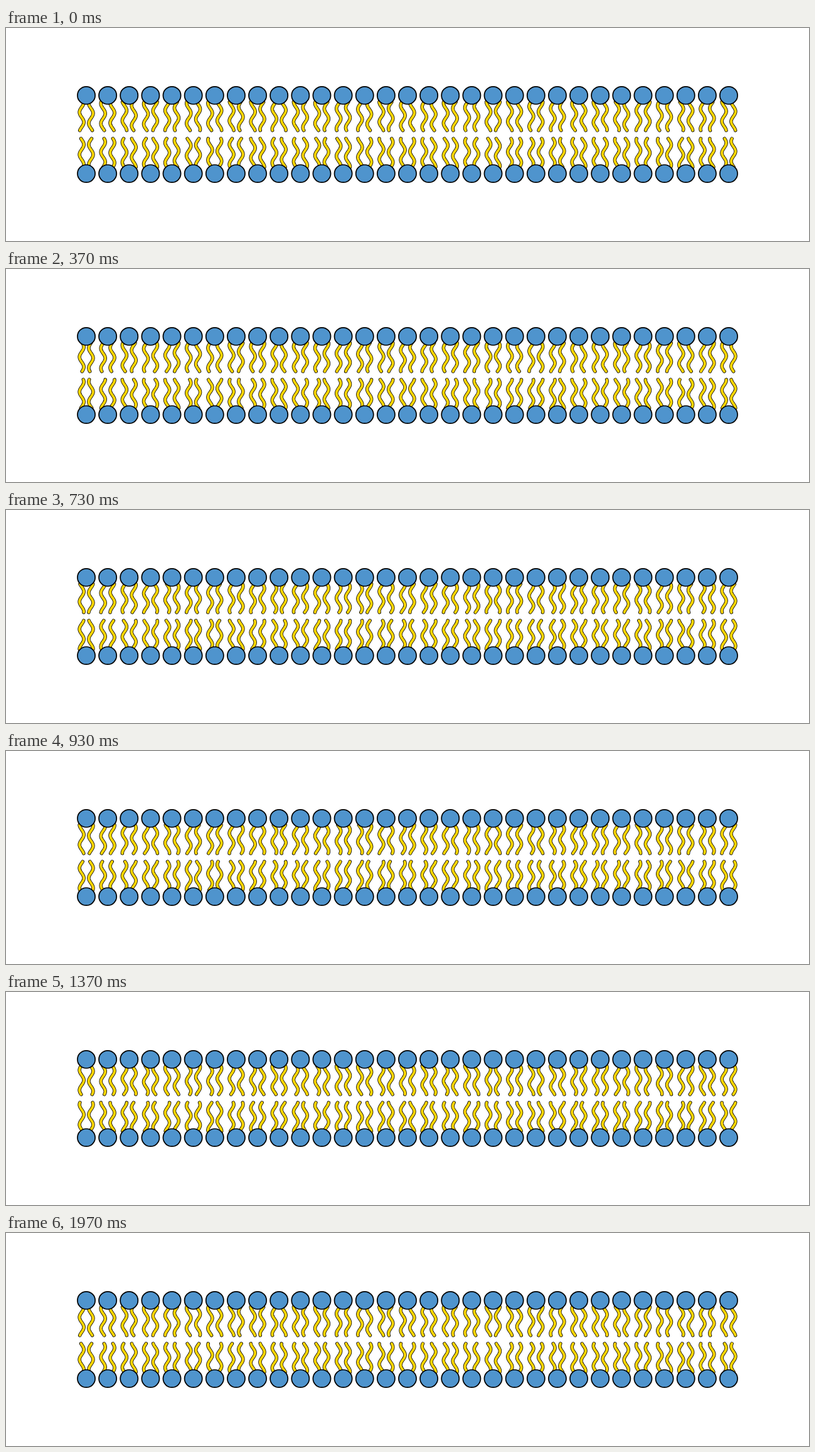
An HTML page with a canvas that plays this animation: 1280 px wide and 341 px high, repeating every 2010 ms.

```html
<!DOCTYPE html>
<html lang="en">
<head>
<meta charset="utf-8">
<title>Lipid bilayer</title>
<style>
  html, body { margin: 0; width: 100%; height: 100%; overflow: hidden; background: #fff; }
  canvas { display: block; width: 1280px; height: 341px; }
</style>
</head>
<body>
<canvas id="stage" width="1280" height="341"></canvas>
<script>
const ctx = document.getElementById('stage').getContext('2d');

const LOOP = 2010, STEPS = 59;
const COUNT = 31, FIRST_X = 128, PITCH = 1024 / 30, MID_Y = 170.5;
const HEAD_OFFSET = 62.6, HEAD_RADIUS = 14.1;
const TAIL_X = 7.4, ROOT = 52, TIP = 5.7;
const SWAY = 3.5, WAVELENGTH = 32;

function seededRandom(seed) {
  return () => (seed = seed * 16807 % 2147483647) / 2147483647;
}

// Each tail leans right at its own moment, mostly late in the loop.
const random = seededRandom(4711);
const tails = [];
for (const side of [-1, 1]) {
  for (let i = 0; i < COUNT; i++) {
    for (const offset of [-TAIL_X, TAIL_X]) {
      const peak = (side < 0 ? 0.76 : 0.5) + 0.7 * (random() - 0.5);
      tails.push({ side, x: FIRST_X + i * PITCH + offset, peak });
    }
  }
}

// A wave running from the head to the free end.
function tailPath({ x, side, peak }, phase) {
  const path = new Path2D();
  for (let y = ROOT; y >= TIP; y -= 0.926) {
    const angle = 2 * Math.PI * (phase - peak + (y - TIP) / WAVELENGTH);
    path.lineTo(x + SWAY * Math.cos(angle), MID_Y + side * y);
  }
  return path;
}

function stroke(path, color, width) {
  ctx.strokeStyle = color;
  ctx.lineWidth = width;
  ctx.stroke(path);
}

function drawTail(tail, phase) {
  const path = tailPath(tail, phase);
  stroke(path, '#000', 5.5);
  stroke(path, '#ffd700', 3.9);
}

function drawHead(x, y) {
  const disc = new Path2D();
  disc.arc(x, y, HEAD_RADIUS, 0, 2 * Math.PI);
  ctx.fillStyle = '#4f94cd';
  ctx.fill(disc);
  stroke(disc, '#000', 1.7);
}

function draw(phase) {
  ctx.fillStyle = '#fff';
  ctx.fillRect(0, 0, 1280, 341);
  ctx.lineCap = ctx.lineJoin = 'round';
  for (const tail of tails) drawTail(tail, phase);
  for (let i = 0; i < COUNT; i++) {
    for (const side of [-1, 1]) {
      drawHead(FIRST_X + i * PITCH, MID_Y + side * HEAD_OFFSET);
    }
  }
}

// Thirty steps a second, on a 10 ms clock.
function phaseAt(ms) {
  const tick = Math.floor((ms % LOOP) / 10) * 10 + 5;
  return Math.min(STEPS, Math.floor(tick * 0.03)) / STEPS;
}

const start = performance.now();
function frame() {
  draw(phaseAt(performance.now() - start));
  requestAnimationFrame(frame);
}
frame();
</script>
</body>
</html>
```
